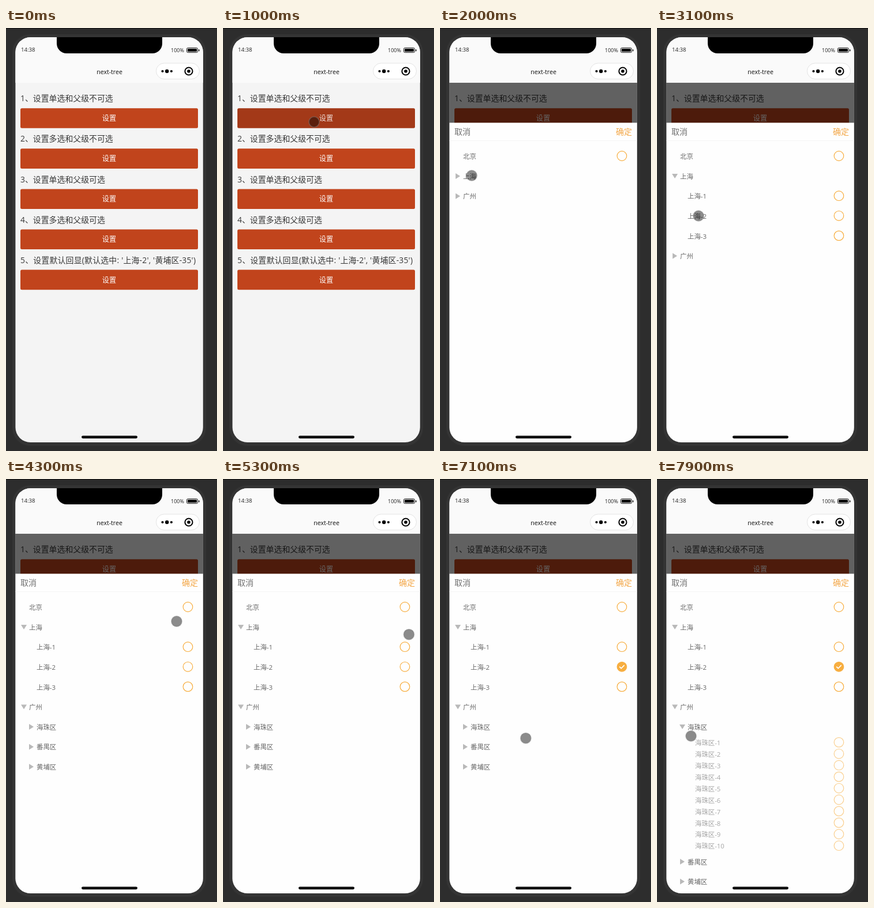
Animation of 366 by 734 pixels, one loop 8 s. Source, as an HTML page:

```html
<!DOCTYPE html>
<html lang="zh-CN">
<head>
<meta charset="utf-8">
<title>next-tree</title>
<style>
html, body { margin: 0; width: 100%; height: 100%; overflow: hidden; background: #2d2d2d; }
svg { display: block; width: 366px; height: 734px; }
text { font-family: "Open Sans", "Noto Sans CJK SC", "Noto Sans CJK", "Noto Sans", sans-serif; white-space: pre; }
</style>
</head>
<body>
<svg id="stage" viewBox="0 0 366 734" xmlns="http://www.w3.org/2000/svg">
  <defs>
    <clipPath id="screen"><rect x="16.4" y="16" width="325.4" height="703" rx="26"/></clipPath>
  </defs>
  <rect width="366" height="734" fill="#2d2d2d"/>
  <rect width="366" height="1" fill="#0c0c0c"/>
  <rect x="11" y="11" width="336" height="714" rx="31" fill="#343434"/>
  <g clip-path="url(#screen)">
    <rect x="16" y="16" width="326" height="703" fill="#f4f4f4"/>
    <g id="page"></g>
    <rect id="shade" x="16" y="95" width="326" height="624" fill="#000"/>
    <g id="sheet">
      <rect x="16" y="164.4" width="326" height="560" fill="#fefefe"/>
      <rect x="16" y="195" width="326" height="1" fill="#f4f4f4"/>
    </g>
    <rect x="16" y="16" width="326" height="79" fill="#fafafa"/>
    <g id="bar"></g>
    <path d="M88 16H271V27a17 17 0 0 1-17 17H105a17 17 0 0 1-17-17Z" fill="#000"/>
    <rect x="313.5" y="34.5" width="19" height="8" rx="2" fill="none" stroke="#111"/>
    <rect x="315" y="36" width="16" height="5" rx=".8" fill="#000"/>
    <rect x="334" y="37" width="1.5" height="3.5" rx=".7" fill="#111"/>
    <rect x="260.5" y="61" width="75" height="27.5" rx="13.75" fill="#fff" stroke="#e3e3e3"/>
    <circle cx="271.5" cy="75" r="2.1"/>
    <circle cx="279.2" cy="75" r="3.2"/>
    <circle cx="286.9" cy="75" r="2.1"/>
    <circle cx="317" cy="75" r="6.6" fill="none" stroke="#000" stroke-width="2"/>
    <circle cx="317" cy="75" r="2.8"/>
    <rect x="131" y="707.4" width="97" height="4.8" rx="2.4" fill="#0c0c0c"/>
    <circle id="cursor" r="9" fill="#000" fill-opacity=".45" stroke="#777" stroke-opacity=".5" stroke-width="1.6"/>
  </g>
</svg>
<script>
const LOOP = 8000, STEP = 100, ROW = 34.6, ORANGE = '#f7ae40';
const $ = id => document.getElementById(id);

function add(parent, tag, attrs) {
  const el = document.createElementNS('http://www.w3.org/2000/svg', tag);
  for (const k in attrs) el.setAttribute(k, attrs[k]);
  return parent.appendChild(el);
}

// cy is the visual middle of the line
function label(parent, str, x, cy, size, fill, anchor = 'start') {
  const el = add(parent, 'text', { x, y: cy + size * .37, 'font-size': size, fill, 'text-anchor': anchor });
  el.textContent = str;
  return el;
}

const clamp = x => Math.min(1, Math.max(0, x));
const smooth = x => x * x * (3 - 2 * x);

// CSS "ease" curve, solved by bisection
function ease(x) {
  if (x <= 0 || x >= 1) return clamp(x);
  const bez = (a, b, u) => 3 * a * u * (1 - u) ** 2 + 3 * b * u * u * (1 - u) + u ** 3;
  let lo = 0, hi = 1;
  for (let i = 0; i < 24; i++) {
    const mid = (lo + hi) / 2;
    if (bez(.25, .25, mid) < x) lo = mid; else hi = mid;
  }
  return bez(.1, 1, lo);
}

// Status bar and title
label($('bar'), '14:38', 26, 37.5, 9.6, '#222');
label($('bar'), '100%', 286, 39, 9, '#222');
label($('bar'), 'next-tree', 179.5, 76.5, 10.6, '#111', 'middle');

// Page
const titles = ['设置单选和父级不可选', '设置多选和父级不可选', '设置单选和父级可选', '设置多选和父级可选',
  "设置默认回显(默认选中: '上海-2', '黄埔区-35')"];
const buttons = titles.map((title, i) => {
  const y = 139.2 + i * 70.1;
  label($('page'), `${i + 1}、${title}`, 25, y - 17, 13.9, '#383838').setAttribute('letter-spacing', i === 4 ? .2 : 0);
  return {
    box: add($('page'), 'rect', { x: 25, y, width: 308, height: 34.6, rx: 2.5, fill: '#c1441c' }),
    text: label($('page'), '设置', 179, y + 17.5, 12.15, '#fff', 'middle')
  };
});

// Sheet
label($('sheet'), '取消', 25, 180.3, 14, '#707070');
label($('sheet'), '确定', 333, 180.3, 14, '#f3a747', 'end');

const nodes = [];
function node(name, depth, parent, opens) {
  const g = add($('sheet'), 'g', {});
  const x = 40 + depth * 13;
  const n = { g, parent, opens };
  label(g, name, x, .5, 11.4, '#666');
  if (opens) n.arrow = add(g, 'path', { fill: '#b9b9b9', transform: `translate(${x - 9} 0)` });
  else {
    n.ring = add(g, 'circle', { cx: 315.5, cy: -.5, r: 8.3, fill: 'none', stroke: ORANGE, 'stroke-width': 1.2 });
    n.tick = add(g, 'path', { d: 'M311.3 -.7l3 3 5.4-5.4', fill: 'none', stroke: '#fff', 'stroke-width': 1.7, visibility: 'hidden' });
  }
  nodes.push(n);
  return n;
}
const leaves = (name, count, depth, parent) =>
  Array.from({ length: count }, (_, i) => node(`${name}-${i + 1}`, depth, parent));

node('北京', 0);
const picks = leaves('上海', 3, 1, node('上海', 0, null, 2700));
const guangzhou = node('广州', 0, null, 3700);
leaves('海珠区', 10, 2, node('海珠区', 1, guangzhou, 7800));
node('番禺区', 1, guangzhou, Infinity);
node('黄埔区', 1, guangzhou, Infinity);

// Cursor strokes: begin, end, x, y; it rests in between
const moves = [
  [100, 400, 48, 162], [400, 700, 158, 163], [1400, 1900, 55, 256],
  [2750, 3100, 72, 326], [3100, 3500, 58, 398], [3750, 4300, 296, 247],
  [4300, 4700, 327, 222], [4950, 5700, 317, 328], [5850, 6300, 67, 433],
  [6300, 6500, 47, 446], [6600, 7000, 156, 450], [7000, 7600, 59, 446]
];

function cursorAt(t) {
  let x = 339, y = 340;
  for (const [begin, end, toX, toY] of moves) {
    const k = smooth(clamp((t - begin) / (end - begin)));
    x += (toX - x) * k;
    y += (toY - y) * k;
  }
  return [x, y];
}

function draw(t) {
  const pressed = t >= 1000 && t < 1300;
  buttons[0].box.setAttribute('fill', pressed ? '#a33918' : '#c1441c');
  buttons[0].text.setAttribute('fill-opacity', pressed ? .85 : 1);

  const shown = ease((t - 1000) / 360);
  $('shade').setAttribute('opacity', .6 * shown);
  $('sheet').setAttribute('transform', `translate(0 ${(1 - shown) * 560})`);

  let y = 222.5 - ROW / 2;
  for (const n of nodes) {
    const p = n.parent ? ease((t - n.parent.opens) / 300) : 1, h = ROW * p;
    n.g.setAttribute('transform', `translate(0 ${y + h / 2})`);
    n.g.setAttribute('opacity', p);
    if (n.arrow) n.arrow.setAttribute('d', t > n.opens ? 'M-5-4H5L0 4Z' : 'M-4-5V5L4 0Z');
    y += h;
  }

  const checked = t >= 5850;
  picks[1].ring.setAttribute('fill', checked ? ORANGE : 'none');
  picks[1].tick.setAttribute('visibility', checked ? 'visible' : 'hidden');

  $('cursor').setAttribute('visibility', t >= 100 ? 'visible' : 'hidden');
  $('cursor').setAttribute('transform', `translate(${cursorAt(t)})`);
}

// The screen refreshes ten times a second
const start = performance.now();
function tick() {
  const t = (performance.now() - start + 4) % LOOP;
  draw(Math.floor(t / STEP) * STEP);
  requestAnimationFrame(tick);
}
tick();
</script>
</body>
</html>
```
